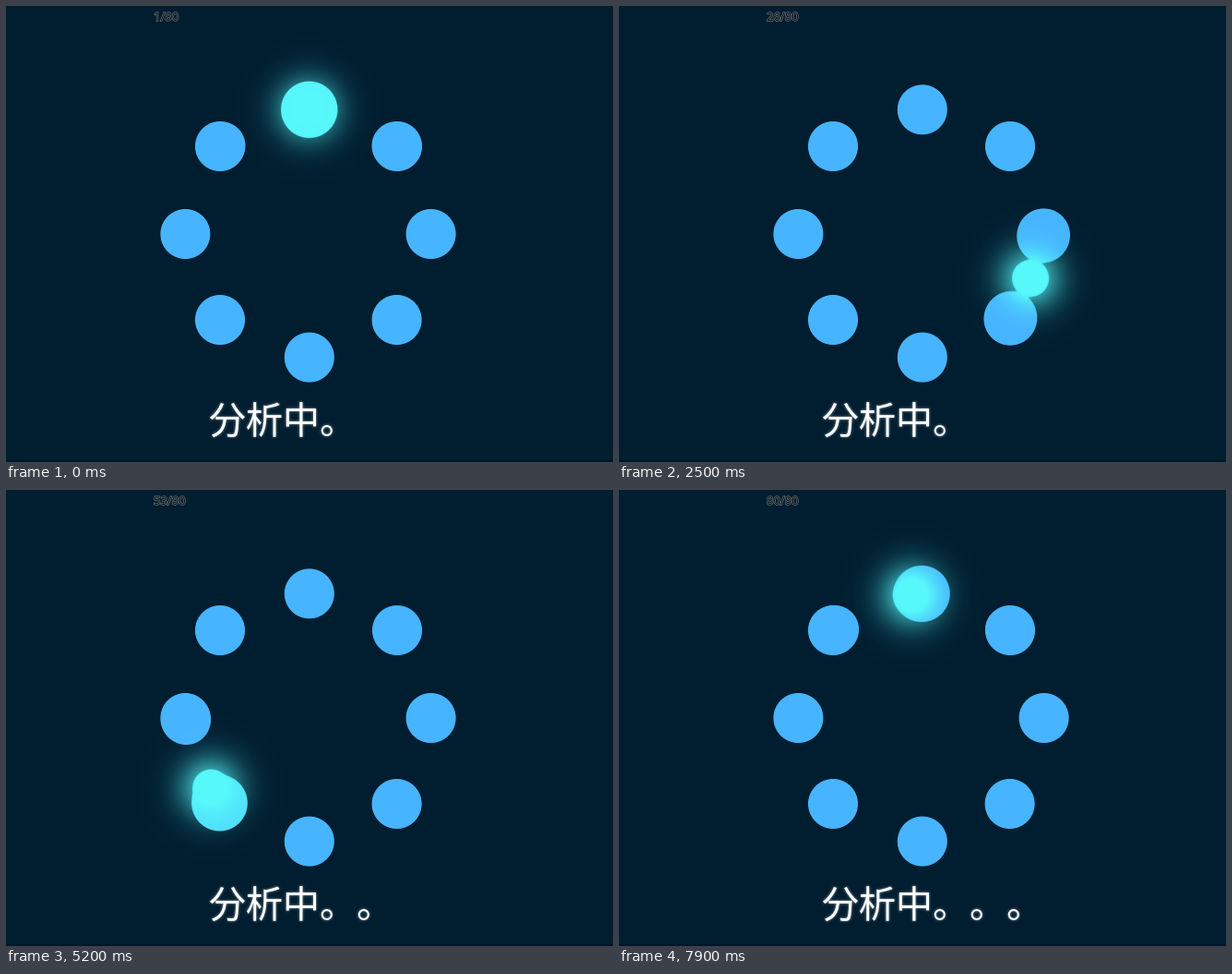
An HTML page with a canvas for the animation above (8000 ms loop, 658 px wide and 494 px high).

```html
<!DOCTYPE html>
<html lang="ja">
<head>
<meta charset="utf-8">
<title>分析中</title>
<style>
  html, body { margin: 0; width: 100%; height: 100%; overflow: hidden; background: #001e30; }
  canvas, svg { position: absolute; left: 0; top: 0; display: block; }
  .count {
    font: 13px "Noto Sans", "Open Sans", sans-serif;
    fill: #0c161c; stroke: #6c7276; stroke-width: 1.3; paint-order: stroke;
  }
  .label {
    font: 40px "Noto Sans CJK JP", "Noto Sans CJK SC", "Noto Sans CJK", sans-serif;
    font-kerning: none;
    font-feature-settings: "chws" 0, "halt" 0, "palt" 0;
    text-spacing-trim: space-all;
    fill: #fff;
    filter: drop-shadow(0 0 1.5px rgba(255, 255, 255, .55));
  }
</style>
</head>
<body>
<canvas id="stage" width="658" height="494"></canvas>
<svg width="658" height="494" viewBox="0 0 658 494">
  <rect y="492" width="658" height="2" fill="#00162a"/>
  <text id="count" class="count" x="160" y="15.5"></text>
  <text id="label" class="label" y="463"></text>
</svg>
<script>
const STEPS = 80, STEP_MS = 100;
const BG = [0, 30, 48], BLUE = [71, 180, 255], CYAN = [86, 248, 250];
const DOTS = [
  [328.8, 112.3], [424, 152], [460.6, 247], [423.6, 340],
  [328.8, 380.6], [232, 340], [194.4, 247], [232, 152]
];
const DOT_R = 27, CORE_R = 15.7, SOFT = 5, REACH = 98;
const BOX = { x: 115, y: 35, w: 420, h: 400 };

const ctx = document.getElementById('stage').getContext('2d');
const count = document.getElementById('count');
const label = document.getElementById('label');
const image = ctx.createImageData(BOX.w, BOX.h);

const clamp = v => Math.max(0, Math.min(1, v));
const mix = (a, b, k) => a + (b - a) * k;
const edge = (d, r) => 1 / (1 + Math.exp(1.702 * (d - r) / SOFT));
const bell = (d2, s) => Math.exp(-d2 / (2 * s * s));

// The path runs through the dots and bows slightly inwards between them.
function lightAt(t) {
  const a = t * Math.PI / 4;
  const r = 134 - 6 * Math.abs(Math.sin(t * Math.PI));
  return [327.8 + r * Math.sin(a), 246 - r * Math.cos(a)];
}

// A dot is lit around the moment the light passes over it.
const litAt = (t, i) => 0.93 * clamp(1 - (Math.abs(t - i) - 0.1) / 0.3);

function drawBlobs(t) {
  const [lx, ly] = lightAt(t);
  const lit = DOTS.map((_, i) => litAt(t, i));
  const px = image.data;
  let p = 0;
  for (let j = 0; j < BOX.h; j++) {
    const y = BOX.y + j + 0.5;
    for (let i = 0; i < BOX.w; i++) {
      const x = BOX.x + i + 0.5;
      const d2 = (x - lx) ** 2 + (y - ly) ** 2;
      const tail = 0.34 * clamp(1 - d2 / REACH ** 2) ** 2;
      let cubes = tail ? edge(Math.sqrt(d2), CORE_R) ** 3 : 0;
      let heat = 0;
      for (let k = 0; k < DOTS.length; k++) {
        const dx = x - DOTS[k][0], dy = y - DOTS[k][1];
        const r2 = dx * dx + dy * dy;
        if (r2 > 2500) continue;
        cubes += edge(Math.sqrt(r2), DOT_R) ** 3;
        heat = Math.max(heat, lit[k]);
      }
      const field = Math.cbrt(cubes) + tail;
      const near = Math.min(1, 1.45 * bell(d2, 20));
      const glow = 0.85 * bell(d2, 23);
      const warm = 1 - (1 - heat) * (1 - near);
      const cover = clamp(0.5 + (field - 0.5) / 0.075);
      for (let c = 0; c < 3; c++) {
        px[p++] = mix(mix(BG[c], CYAN[c], glow), mix(BLUE[c], CYAN[c], warm), cover);
      }
      px[p++] = 255;
    }
  }
  ctx.putImageData(image, BOX.x, BOX.y);
}

function render(step) {
  drawBlobs(step * STEP_MS / 1000);
  count.textContent = `${step + 1}/${STEPS}`;
  const text = '分析中' + '。'.repeat(1 + Math.floor(step * 3 / STEPS));
  label.setAttribute('x', [...text].map((_, i) => 220 + 40 * i).join(' '));
  label.textContent = text;
}

ctx.fillStyle = `rgb(${BG})`;
ctx.fillRect(0, 0, 658, 494);

const start = performance.now();
let shown = -1;
function tick() {
  const step = Math.floor((performance.now() - start) / STEP_MS) % STEPS;
  if (step !== shown) render(shown = step);
  requestAnimationFrame(tick);
}
tick();
</script>
</body>
</html>
```
